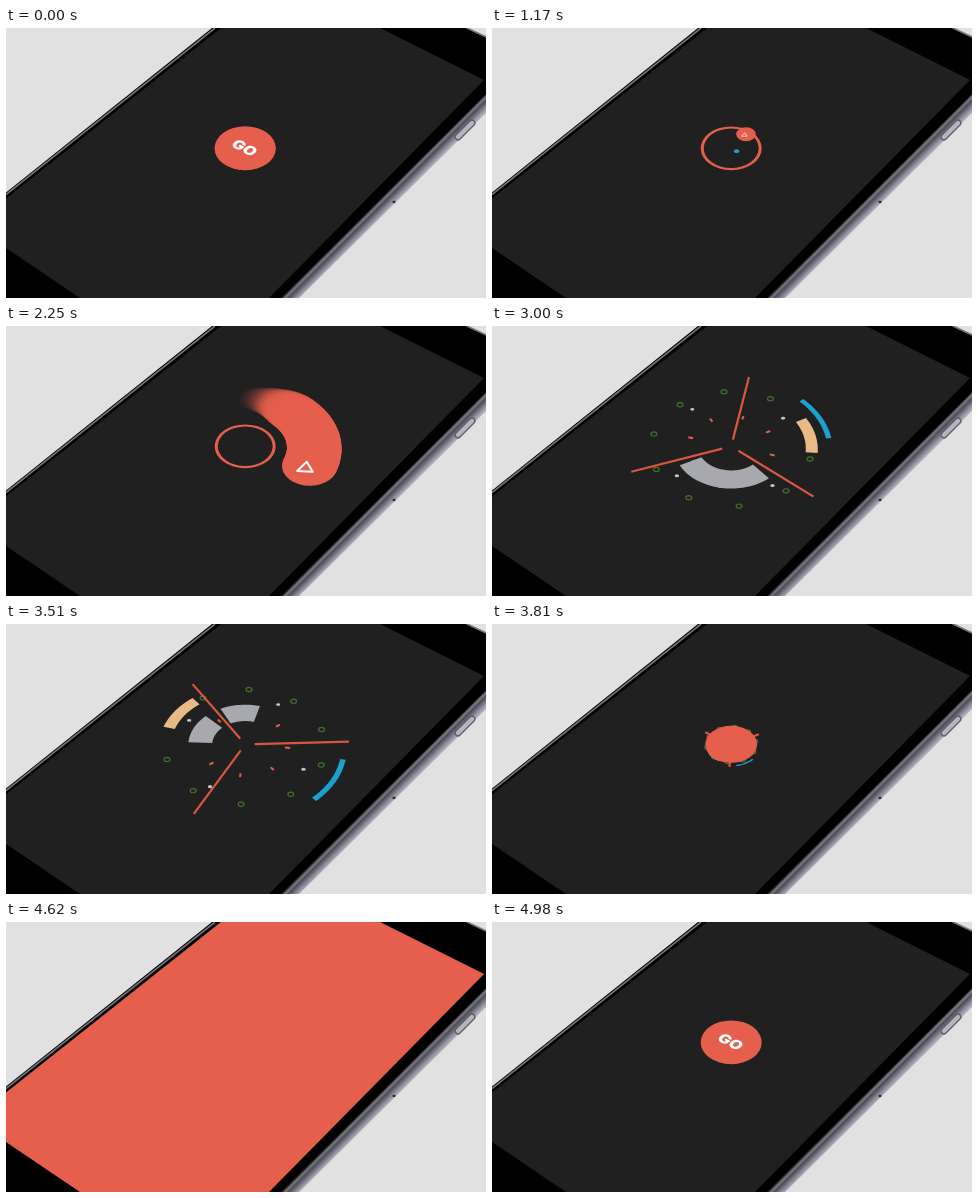
Write an HTML page with a canvas that moves like this. It is 480 by 270 pixels and loops after 5.01 s.

```html
<!DOCTYPE html>
<html lang="en">
<head>
<meta charset="utf-8">
<title>Go menu on a phone</title>
<style>
html, body { margin: 0; width: 100%; height: 100%; overflow: hidden; background: #e1e1e1; }
canvas { display: block; width: 480px; height: 270px; }
</style>
</head>
<body>
<canvas id="stage" width="480" height="270"></canvas>
<script>
const ctx = document.getElementById('stage').getContext('2d');
const LOOP = 5010, CX = 239.2, CY = 120.3, SQUASH = 0.717;
const RED = '#e65f4d', DARK = '#202020', BLUE = '#1da0cf', PEACH = '#e9b986', GREY = '#a8a8af';
const BUTTON = 30.5, RIM = 3, ORBIT = 69, BALL = 27.3;
const GO_FONT = '900 17.5px Inter, sans-serif', START_FONT = '400 27.5px Lato, sans-serif';
const TAU = Math.PI * 2;

const clamp = v => Math.max(0, Math.min(1, v));
const span = (t, from, to) => clamp((t - from) / (to - from));
const mix = (a, b, p) => a + (b - a) * p;
const inOut = p => p < 0.5 ? 2 * p * p : 1 - 2 * (1 - p) ** 2;
const out = p => 1 - (1 - p) ** 3;
const outBack = p => 1 + 2.7 * (p - 1) ** 3 + 1.7 * (p - 1) ** 2;

// Polar position on the tilted screen plane, with slight perspective.
function at(radius, degrees) {
  const a = degrees * Math.PI / 180;
  const x = radius * Math.cos(a), y = radius * Math.sin(a);
  const zoom = 1 / (1 - 0.00057 * y);
  return { x: CX + x * zoom, y: CY + y * SQUASH * zoom, zoom };
}

function poly(points, fill) {
  ctx.beginPath();
  points.forEach(([x, y]) => ctx.lineTo(x, y));
  ctx.closePath();
  if (fill) { ctx.fillStyle = fill; ctx.fill(); }
}

function line(a, b, color, width) {
  ctx.beginPath();
  ctx.moveTo(a.x, a.y);
  ctx.lineTo(b.x, b.y);
  ctx.strokeStyle = color;
  ctx.lineWidth = width;
  ctx.stroke();
}

function disc(p, r, color, alpha = 1) {
  if (r <= 0 || alpha <= 0) return;
  ctx.globalAlpha = alpha;
  ctx.fillStyle = color;
  ctx.beginPath();
  ctx.ellipse(p.x, p.y, r * p.zoom, r * p.zoom * SQUASH, 0, 0, TAU);
  ctx.fill();
  ctx.globalAlpha = 1;
}

function ring(p, outer, inner, color) {
  if (outer <= 0) return;
  ctx.fillStyle = color;
  ctx.beginPath();
  ctx.ellipse(p.x, p.y, outer, outer * SQUASH, 0, 0, TAU);
  if (inner > 0) ctx.ellipse(p.x, p.y, inner, inner * SQUASH, 0, 0, TAU);
  ctx.fill('evenodd');
}

function sector(inner, outer, mid, width, color) {
  if (width <= 0) return;
  const points = [];
  const edge = (r, dir) => {
    for (let i = 0; i <= 20; i++) {
      const p = at(r, mid + dir * width * (i / 20 - 0.5));
      points.push([p.x, p.y]);
    }
  };
  edge(outer, 1);
  edge(inner, -1);
  poly(points, color);
}

function label(text, font, alpha) {
  if (alpha <= 0) return;
  const a = 36 * Math.PI / 180, c = Math.cos(a), s = Math.sin(a);
  ctx.save();
  ctx.globalAlpha = alpha;
  ctx.transform(c, s * SQUASH, -s, c * SQUASH, CX - 0.5, CY - 0.8);
  ctx.font = font;
  ctx.textAlign = 'center';
  ctx.textBaseline = 'alphabetic';
  ctx.fillStyle = '#fff';
  const m = ctx.measureText('S');
  ctx.fillText(text, 0, (m.actualBoundingBoxAscent - m.actualBoundingBoxDescent) / 2);
  ctx.restore();
}

const SCREEN = [[0, 170.5], [215, 0], [374, 0], [478, 52], [263, 270], [74, 270], [0, 220]];

function phone() {
  ctx.fillStyle = '#e1e1e1';
  ctx.fillRect(0, 0, 480, 270);
  const side = ctx.createLinearGradient(363, 183, 372, 192);
  side.addColorStop(0, '#26262a');
  side.addColorStop(0.15, '#7c7c84');
  side.addColorStop(0.35, '#4c4c56');
  side.addColorStop(0.6, '#747482');
  side.addColorStop(0.85, '#9c9caa');
  side.addColorStop(1, '#b0b0ba');
  poly([[480, 62], [480, 85], [293, 270], [270, 270]], side);
  poly([[0, 164.5], [206, 0], [460, 0], [480, 9], [480, 66], [275, 270], [0, 270]], '#000');
  line({ x: 0, y: 166.5 }, { x: 209, y: 0 }, '#74747a', 1.6);
  line({ x: 461, y: 0 }, { x: 480, y: 9 }, '#74747a', 1.6);
  poly(SCREEN, DARK);
  ctx.lineCap = 'round';
  line({ x: 452, y: 109 }, { x: 466, y: 95 }, '#5c5c69', 7);
  line({ x: 452, y: 109 }, { x: 466, y: 95 }, '#b5b5c0', 4.4);
  ctx.lineCap = 'butt';
  disc({ x: 388, y: 174, zoom: 1 }, 1.6, '#24242c');
}

function triangle(p, size) {
  if (size <= 0.1) return;
  poly([[-3, -4.2], [-12.5, 5.2], [3, 5.8]].map(([x, y]) => [p.x + x * size, p.y + y * size]));
  ctx.strokeStyle = '#fff';
  ctx.lineWidth = 2 * size;
  ctx.lineJoin = 'round';
  ctx.stroke();
}

const centre = at(0, 0);

function button(t) {
  const ripple = span(t, 0, 300);
  if (ripple > 0 && ripple < 1) disc(centre, mix(BUTTON, 47, out(ripple)), RED, 0.6 * (1 - ripple));
  const open = out(span(t, 780, 1080));
  const gone = 1 - inOut(span(t, 2400, 2580));
  ring(centre, BUTTON * gone, (BUTTON - RIM) * open * gone, RED);
  label('GO', GO_FONT, 1 - span(t, 780, 900));
}

const BALLS = [
  { start: 1126, color: RED },
  { start: 1160, color: BLUE },
  { start: 1230, color: GREY },
  { start: 1280, color: PEACH }
];
const sweep = t => 540 * inOut(span(t, 1920, 2400));

function menu(t) {
  const travelled = sweep(t);
  for (let i = 3; i >= 0; i--) {
    const { start, color } = BALLS[i];
    if (t < start) continue;
    const grow = outBack(span(t, start, start + 520));
    if (i) {
      const left = 1 - span(travelled, i * 90 - 30, i * 90 + 10);
      disc(at(ORBIT * grow, -53 + i * 90), BALL * grow * left, color);
      continue;
    }
    const size = grow * (1 - inOut(span(t, 2400, 2520)));
    if (travelled > 0) {
      for (let n = 0; n < 56; n++) {
        const angle = -53 + sweep(t - 62 * (1 - n / 56));
        const r = BALL * size * Math.min(1, 0.6 + n / 40);
        disc(at(ORBIT, angle), r, RED, Math.min(1, 0.03 + (n / 28) ** 2));
      }
    }
    const head = at(ORBIT * grow, -53 + travelled);
    disc(head, BALL * size, RED);
    triangle(head, size);
  }
}

function dial(t) {
  const turn = (t - 3000) / 510;
  const shrink = 1 - span(t, 3560, 3860) ** 2;
  if (shrink <= 0) return;
  const g = out(span(t, 2460, 2900));
  const k = shrink * mix(0.5, 1, g);
  const each = (count, offset, draw) => {
    for (let i = 0; i < count; i++) draw(offset + i * 360 / count);
  };

  each(10, 12.6 + 8.2 * turn, a => {
    const p = at(80 * k, a);
    ctx.beginPath();
    ctx.ellipse(p.x, p.y, 2.9 * g, 2.1 * g, 0, 0, TAU);
    ctx.strokeStyle = '#41702c';
    ctx.lineWidth = 1.2;
    ctx.stroke();
  });
  each(4, 53 - 22.2 * turn, a => disc(at(66.5 * k, a), 2.1 * g, '#c3c3c8'));
  each(8, 16.3 - 9.8 * turn, a => line(at(40 * k, a), at((40 + 5 * g) * k, a), RED, 2));

  const grey = mix(53, 42, clamp(turn)) * g;
  sector(33 * k, 57 * k, 76 + 127.7 * turn, grey, GREY);
  sector(33 * k, 57 * k, 126 + 138.2 * turn, grey, GREY);
  sector(74.5 * k, 86.5 * k, -10.5 - 135.5 * turn, 34 * g, PEACH);
  sector(96 * k, 101.5 * k, -24.6 + 54.6 * turn, 36 * g, BLUE);

  const reach = out(span(t, 2640, 2970));
  if (reach > 0) each(3, 40.5 - 42.5 * turn, a =>
    line(at(9.5 * k, a), at(mix(9.5, 104, reach) * k, a), '#d9563f', 2.2));
}

function finale(t) {
  const grow = span(t, 3720, 4040) ** 2;
  const back = inOut(span(t, 4620, 4950));
  disc(centre, back > 0 ? mix(320, BUTTON, back) : 320 * grow, RED);
  label('Start', START_FONT, span(t, 3930, 4070) * (1 - span(t, 4350, 4580)));
  label('GO', GO_FONT, span(t, 4830, 4950));
}

function draw(t) {
  phone();
  ctx.save();
  poly(SCREEN);
  ctx.clip();
  if (t < 2600) button(t);
  if (t < 2520) menu(t);
  if (t > 2460) dial(t);
  if (t > 3720) finale(t);
  ctx.restore();
}

const begin = performance.now();
function tick() {
  draw((performance.now() - begin) % LOOP);
  requestAnimationFrame(tick);
}
tick();
</script>
</body>
</html>
```
